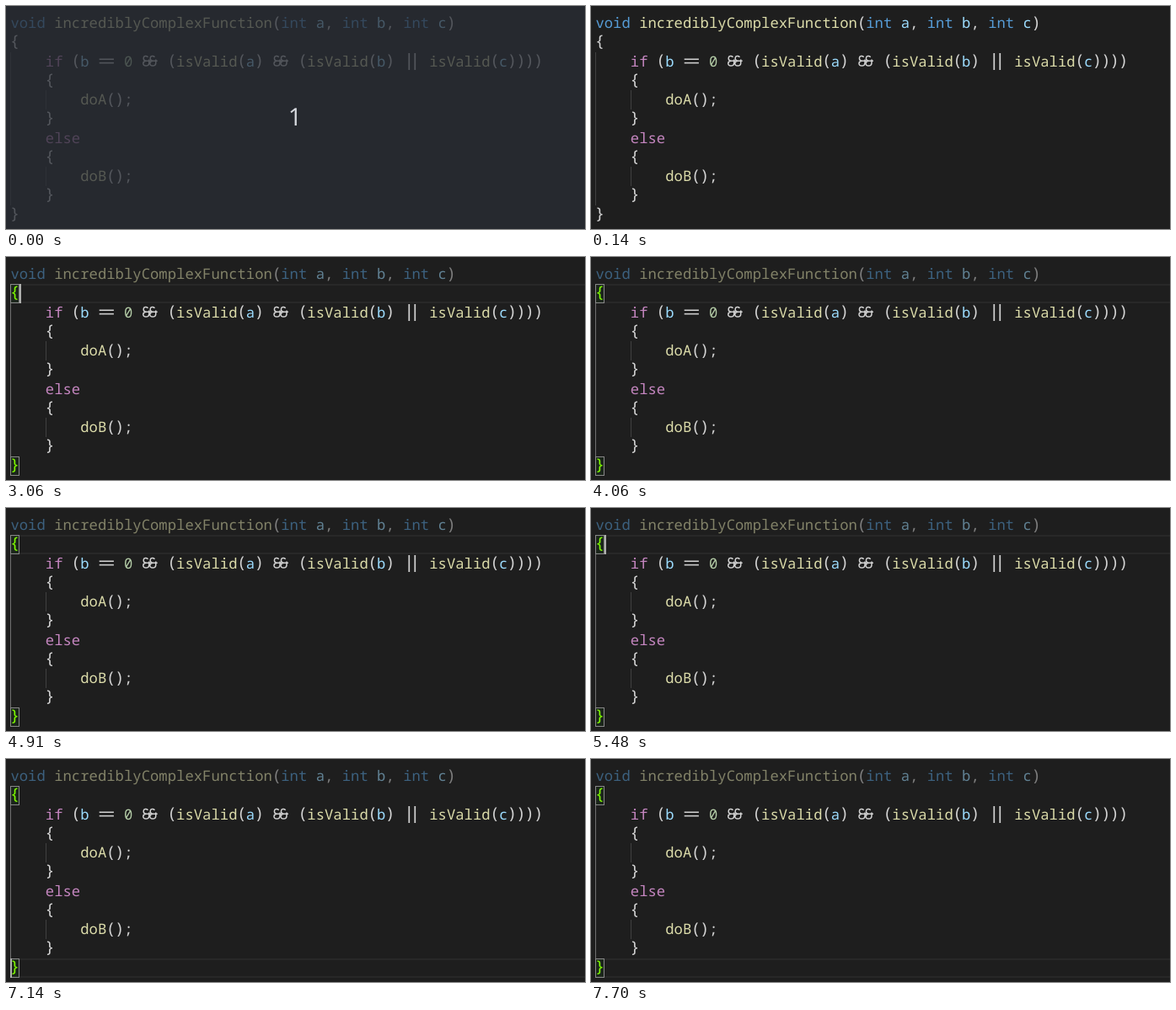
Write an HTML page with a canvas that moves like this. It is 687x265 px and loops after 8000 ms.

```html
<!DOCTYPE html>
<html>
<head>
<meta charset="utf-8">
<style>
html, body { margin: 0; width: 100%; height: 100%; overflow: hidden; background: #1e1e1e; }
canvas { display: block; }
</style>
</head>
<body>
<canvas width="687" height="265"></canvas>
<script>
const ctx = document.querySelector('canvas').getContext('2d');
const LOOP = 8000, LEFT = 5.4, CELL = 10.35, TOP = 9.4, ROW = 22.75;
const COLORS = {
  plain: '#d4d4d4', type: '#569cd6', func: '#dcdcaa',
  param: '#9cdcfe', number: '#b5cea8', keyword: '#c586c0'
};
const CODE = [
  'void incrediblyComplexFunction(int a, int b, int c)',
  '{',
  '    if (b == 0 && (isValid(a) && (isValid(b) || isValid(c))))',
  '    {',
  '        doA();',
  '    }',
  '    else',
  '    {',
  '        doB();',
  '    }',
  '}'
];
const tokens = CODE.map(line => [...line.matchAll(/\w+|&&|\|\||==|[^\s\w]/g)]);
const rowTop = row => Math.round(TOP + ROW * row);

function kind(word) {
  if (/^(void|int)$/.test(word)) return 'type';
  if (/^(if|else)$/.test(word)) return 'keyword';
  if (/^\d/.test(word)) return 'number';
  if (/^[abc]$/.test(word)) return 'param';
  return /^\w/.test(word) ? 'func' : 'plain';
}

function rect(color, x, y, w, h) {
  ctx.fillStyle = color;
  ctx.fillRect(x, y, w, h);
}

// Joined two-character operators
function operator(op, x, mid) {
  if (op === '==') {
    for (const y of [mid - 3, mid + 1.4]) rect(COLORS.plain, x + 1.8, y, 17.2, 1.5);
  } else if (op === '||') {
    for (const dx of [6.3, 13.3]) rect(COLORS.plain, x + dx, mid - 9.5, 1.7, 20);
  } else {
    const amp = new Path2D(
      'M6.8-4.8C5-6.8 1.5-6.2 1.5-3.4C1.5-1.5 3-.3 5-.3H10' +
      'M4.5-.3C0 0 0 5.6 4.3 5.6C7 5.6 8.1 4 8.1 2V-2');
    ctx.strokeStyle = COLORS.plain;
    ctx.lineWidth = 1.5;
    for (const dx of [1, 9]) {
      ctx.save();
      ctx.translate(x + dx, mid);
      ctx.stroke(amp);
      ctx.restore();
    }
  }
}

function drawWord(word, col, row, color) {
  const x = LEFT + col * CELL, base = 26 + ROW * row;
  if (/^(&&|\|\||==)$/.test(word)) return operator(word, x, base - 6);
  const bracket = /[(){}]/.test(word);
  ctx.font = `500 ${bracket ? 19 : 17.2}px "Noto Sans Mono", monospace`;
  ctx.fillStyle = color;
  const y = bracket ? base - 0.4 : base;
  [...word].forEach((ch, i) => ctx.fillText(ch, x + (i + 0.5) * CELL, y));
}

function drawCode(active) {
  rect(active ? '#707070' : '#404040', 5, rowTop(2), 1, rowTop(10) - rowTop(2));
  for (const row of [4, 8]) rect('#404040', 47, rowTop(row), 1, 23);
  tokens.forEach((line, row) => {
    const matched = active && (row === 1 || row === 10);
    ctx.globalAlpha = active && row === 0 ? 0.53 : 1;
    if (matched) {
      ctx.strokeStyle = '#888';
      ctx.lineWidth = 1;
      ctx.strokeRect(5.5, rowTop(row) + 0.5, 10, 22);
      rect('rgba(0,100,0,.1)', 6, rowTop(row) + 1, 9, 21);
    }
    for (const t of line) drawWord(t[0], t.index, row, matched ? '#80ff00' : COLORS[kind(t[0])]);
  });
  ctx.globalAlpha = 1;
}

function drawCountdown() {
  rect('rgba(40,44,52,.75)', 0, 0, 687, 265);
  ctx.font = '500 29px "Open Sans", sans-serif';
  ctx.fillStyle = '#d7dae0';
  ctx.fillText('1', 343, 142);
}

function frame(now) {
  const t = now % LOOP;
  const active = t >= 3060, row = t < 6300 ? 1 : 10;
  rect('#1e1e1e', 0, 0, 687, 265);
  ctx.textAlign = 'center';
  ctx.textRendering = 'geometricPrecision';
  if (active) {
    const y = rowTop(row);
    rect('#282828', 5, y, 682, 2);
    rect('#282828', 5, y + 21, 682, 2);
  }
  drawCode(active);
  if (t < 140) drawCountdown();
  const blinkOn = t < 4060 || (t >= 5480 && t < 7700);
  if (active && blinkOn) rect('#aeafad', row === 1 ? 16 : 5, rowTop(row), 2, 23);
  requestAnimationFrame(frame);
}
requestAnimationFrame(frame);
</script>
</body>
</html>
```
